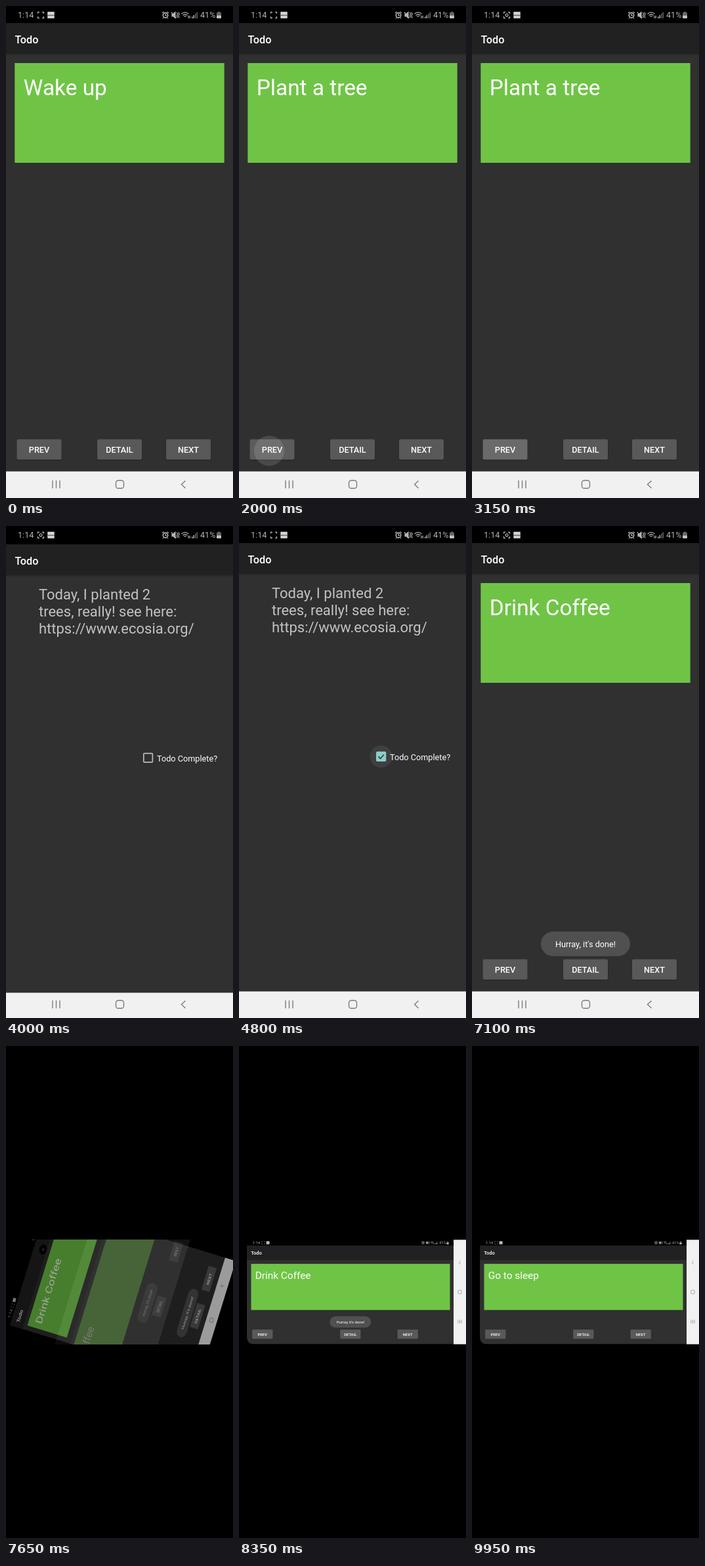
Animation, 346 px wide and 750 px high, one loop 10000 ms. Source, as an HTML page:

```html
<!DOCTYPE html>
<html lang="en">
<head>
<meta charset="utf-8">
<title>Todo</title>
<style>
html, body { margin: 0; width: 100%; height: 100%; overflow: hidden; background: #000; }
#stage { position: relative; width: 346px; height: 750px; overflow: hidden; background: #000; isolation: isolate; }
svg { position: absolute; display: block; overflow: hidden; font-family: Roboto, sans-serif; }
#tall { left: 0; top: 0; }
#wide { left: -202px; top: 202px; mix-blend-mode: plus-lighter; }
.title { font-size: 16.2px; font-weight: 500; fill: #fff; }
.card { font-size: 33.4px; fill: #fff; }
.btn { font-size: 12.7px; font-weight: 500; fill: #fff; text-anchor: middle; }
.small { font-size: 12.7px; fill: #fff; }
.note { font-size: 22px; fill: #c2c2c2; }
.clock { font-size: 12.6px; fill: #b4b4b4; }
.line { fill: none; stroke: #b4b4b4; stroke-width: 1.2; }
.nav { fill: none; stroke: #7c7c7c; stroke-width: 1.4; }
</style>
</head>
<body>
<div id="stage"></div>
<script>
const LOOP = 10000, CUT = 7550, TURN = 7536, TURN_MS = 400, FIT = 346 / 750;
const ITEMS = ['Wake up', 'Drink Coffee', 'Plant a tree', 'Go to sleep'];
const NAMES = ['PREV', 'DETAIL', 'NEXT'];

// [time, item]
const SHOWN = [[0, 0], [450, 1], [900, 2], [1350, 3], [1930, 2], [5650, 1], [8700, 2], [9400, 3]];
// [time, button, duration, highlight]
const PRESSES = [
  [380, 2, 320, .15], [830, 2, 320, .15], [1280, 2, 320, .15], [1880, 0, 1400, .1],
  [3350, 1, 350, .15], [5550, 0, 600, .29], [8630, 2, 320, .15], [9330, 2, 320, .15]
];

const TALL = { id: 'tall', w: 346, h: 750, left: 0, right: 346, bar: 26, head: 73, clockY: 18.2, clockX: 18, endX: 329,
  card: [13.3, 87, 319.4, 152], btnY: 660.5, btnX: [16.5, 139, 244], toast: [173, 637], body: 709.5 };
const WIDE = { id: 'wide', w: 750, h: 346, left: 26, right: 709, bar: 20, head: 67, clockY: 14.8, clockX: 45, endX: 694,
  card: [40, 80, 657, 152.5], btnY: 297, btnX: [43.5, 334, 523.5], toast: [368, 272], body: 346 };

const rect = (x, y, w, h, fill, more = '') =>
  `<rect x="${x}" y="${y}" width="${w}" height="${h}" fill="${fill}" ${more}/>`;
const text = (x, y, cls, str, more = '') => `<text x="${x}" y="${y}" class="${cls}" ${more}>${str}</text>`;
const path = (d, cls, more = '') => `<path d="${d}" class="${cls}" ${more}/>`;

function frame(s) {
  const w = s.right - s.left;
  return rect(s.left, 0, w, s.bar, '#000')
    + rect(s.left, s.bar, w, s.h - s.bar, '#303030')
    + rect(s.left, s.head, w, 2, '#2a2a2a')
    + rect(s.left, s.bar, w, s.head - s.bar, '#212121')
    + text(s.left + 13.6, s.head - 16.5, 'title', 'Todo');
}

function status(s) {
  const y = s.clockY - 4.4, e = s.endX;
  return text(s.clockX, s.clockY, 'clock', '1:14')
    + `<g transform="translate(${s.clockX + 35} ${y})">`
    + path('M-4.5 -2V-4.5H-2M2 -4.5H4.5V-2M4.5 2V4.5H2M-2 4.5H-4.5V2', 'line')
    + '<g class="rec"><circle r="2" class="line"/></g>'
    + rect(10.3, -5, 10.4, 10, '#d4d4d4') + rect(10.3, -.2, 10.4, 1.2, '#555') + '</g>'
    + `<g transform="translate(${e} ${y})">`
    + '<circle cx="-86" cy=".3" r="3.7" class="line" style="stroke-width:1.7"/>'
    + path('M-86 -2V.6H-84M-91 -3L-88.5 -5M-81 -3L-83.5 -5M-89 4L-90 5.2M-83 4L-82 5.2', 'line')
    + path('M-76 -1.8H-74L-71 -4.5V4.5L-74 1.8H-76Z', 'line', 'style="fill:#b4b4b4"')
    + path('M-77 -4.5L-69.5 4.5M-68.5 -4L-67.5 -1L-68.5 1L-67.5 4M-66 -4.5L-65 -1L-66 1L-65 4.5', 'line')
    + path('M-61.5 -1.8Q-56 -6.5 -50.5 -1.8M-59.5 .5Q-56 -2.6 -52.5 .5M-57.8 2.4Q-56 1 -54.2 2.4', 'line')
    + path('M-51 1V5M-48.8 1V5', 'line')
    + [0, 1, 2, 3].map(i => rect(-46 + i * 2.5, 2.5 - i * 2.3, 1.5, 2.5 + i * 2.3, i < 2 ? '#b4b4b4' : '#666')).join('')
    + text(-33, 4.4, 'clock', '41%')
    + rect(-8, -4, 7, 9, '#666', 'rx="1"') + rect(-6, -5.2, 3, 1.5, '#666') + rect(-8, .8, 7, 4.2, '#c4c4c4', 'rx="1"')
    + '</g>';
}

function navIcons(spots) {
  const icons = [
    path('M-5.5 -6V6M0 -6V6M5.5 -6V6', 'nav'),
    '<rect x="-6" y="-6" width="12" height="12" rx="3.6" class="nav"/>',
    path('M3 -5.6L-3 0L3 5.6', 'nav')
  ];
  return icons.map((icon, i) => `<g transform="translate(${spots[i]})">${icon}</g>`).join('');
}

function button(s, i) {
  const x = s.btnX[i], y = s.btnY;
  return rect(x - .5, y + .5, 69, 32, '#000', 'rx="2.5" opacity=".2"')
    + rect(x, y, 68, 31, '#595959', 'rx="2"')
    + rect(x, y, 68, 31, '#fff', 'rx="2" class="glow" opacity="0"')
    + `<circle class="wave" cx="${x + (i ? 36 : 29.5)}" cy="${y + 17.5}" r="0" fill="#fff" opacity="0"/>`
    + text(x + 34, y + 20.8, 'btn', NAMES[i]);
}

function mainWindow(s) {
  const [x, y, w, h] = s.card;
  return frame(s) + rect(x, y, w, h, '#6fc446')
    + text(x + 13.5, y + 49, 'card', '', 'data-item')
    + NAMES.map((_, i) => button(s, i)).join('');
}

function toast(s) {
  const [x, y] = s.toast;
  return '<g class="toast">' + rect(x - 68, y - 18.7, 136, 37.4, '#505050', 'rx="18.7"')
    + text(x, y + 4.6, 'small', 'Hurray, it\'s done!', 'text-anchor="middle"') + '</g>';
}

function detailWindow(s) {
  const lines = ['Today, I planted 2', 'trees, really! see here:', 'https://www.ecosia.org/'];
  return '<g id="detail">' + frame(s)
    + lines.map((l, i) => text(50, 110 + i * 26, 'note', l)).join('')
    + '<rect x="209.8" y="344.6" width="13.6" height="13.6" rx="1.2" fill="none" stroke="#bdbdbd" stroke-width="1.7" id="box"/>'
    + path('M212.5 351.5L215.5 354.5L220.8 348.5', '', 'id="tick" fill="none" stroke="#303030" stroke-width="1.8"')
    + '<circle id="tap" cx="216.6" cy="351.4" fill="#fff"/>'
    + text(230, 356.5, 'small', 'Todo Complete?')
    + rect(0, s.body, s.w, 45, '#f1f1f1') + '</g>';
}

function svg(s, inner) {
  return `<svg id="${s.id}" width="${s.w}" height="${s.h}" viewBox="0 0 ${s.w} ${s.h}">${inner}</svg>`;
}

const stage = document.getElementById('stage');
stage.innerHTML =
  svg(TALL, mainWindow(TALL) + rect(0, TALL.body, 346, 45, '#f1f1f1') + detailWindow(TALL) + toast(TALL)
    + '<g id="bubble"><circle cx="222" cy="60" r="14" fill="#050505"/><circle cx="222" cy="60" r="3" fill="#555"/></g>'
    + status(TALL) + navIcons(['76.5 729.3', '173.5 729.3', '270.5 729.3']))
  + svg(WIDE, rect(0, 0, 750, 346, '#000')
    + '<clipPath id="corner"><path d="M26 0H709V346H52Q26 346 26 320Z"/></clipPath>'
    + `<g clip-path="url(#corner)">${mainWindow(WIDE)}</g>` + rect(709, 0, 41, 346, '#f1f1f1')
    + toast(WIDE) + status(WIDE) + navIcons(['729.5 271', '729.5 173', '729.5 76']));

const $ = id => document.getElementById(id);
const all = sel => [...stage.querySelectorAll(sel)];
const tall = $('tall'), wide = $('wide');
const labels = all('[data-item]'), glows = all('.glow'), waves = all('.wave'), toasts = all('.toast'), recs = all('.rec');
const set = (el, attrs) => { for (const k in attrs) el.setAttribute(k, attrs[k]); };
const ramp = (t, from, to) => Math.min(1, Math.max(0, (t - from) / (to - from)));
const easeOut = k => 1 - (1 - k) ** 3;

function drawButtons(t) {
  glows.forEach((glow, n) => {
    let shade = 0, r = 0, fade = 0;
    for (const [at, which, dur, peak] of PRESSES) {
      const age = t - at;
      if (which !== n % 3 || age < 0 || age > dur) continue;
      shade = peak * ramp(age, 100, 230) * (1 - ramp(age, dur - 120, dur));
      r = 23 * (age / 120) ** .5;
      fade = .12 * (1 - ramp(age, 130, 260));
    }
    set(glow, { opacity: shade });
    set(waves[n], { r, opacity: fade });
  });
}

function drawDetail(t) {
  const open = easeOut(ramp(t, 3600, 3900)), close = ramp(t, 5000, 5250);
  const y = 40 * (1 - open) + 2 * (1 - ramp(t, 4450, 4550)) + 40 * close * close;
  set($('detail'), { opacity: Math.min(open, 1 - close), transform: `translate(0 ${y})` });
  const on = t >= 4650;
  set($('box'), { fill: on ? '#80cbc4' : 'none', stroke: on ? '#80cbc4' : '#bdbdbd' });
  set($('tick'), { opacity: +on });
  set($('tap'), { r: 17 * easeOut(ramp(t, 4550, 4750)), opacity: t < 4550 ? 0 : .15 * (1 - ramp(t, 4700, 4900)) });
}

function drawTurn(t) {
  const cut = t >= CUT, k = ramp(t, TURN, TURN + TURN_MS);
  const p = (1 - Math.cos(Math.PI * k)) / 2, mix = Math.min(1, k / .81), angle = -90 * (1 - p);
  stage.style.clipPath = cut ? 'inset(295px 0)' : 'none';
  const sx = FIT + (1 - FIT) * p, sy = FIT + (160 / 750 - FIT) * p;
  tall.style.transform = cut ? `rotate(${angle}deg) scale(${sx}, ${sy})` : 'none';
  tall.style.opacity = cut ? 1 - mix : 1;
  wide.style.transform = `rotate(${angle}deg) scale(${FIT})`;
  wide.style.opacity = cut ? mix : 0;
  set($('bubble'), { opacity: +cut });
}

function draw(t) {
  const item = ITEMS[SHOWN.filter(s => s[0] <= t).pop()[1]];
  labels.forEach(l => { if (l.textContent !== item) l.textContent = item; });
  const blink = t % 3000;
  recs.forEach(r => set(r, { opacity: +(t < CUT && blink >= 100 && blink < 1450) }));
  toasts.forEach(o => set(o, { opacity: ramp(t, 5150, 5300) * (1 - ramp(t, 8500, 8700)) }));
  drawButtons(t);
  drawDetail(t);
  drawTurn(t);
}

const start = performance.now();
function tick() {
  draw((performance.now() - start) % LOOP);
  requestAnimationFrame(tick);
}
tick();
</script>
</body>
</html>
```
